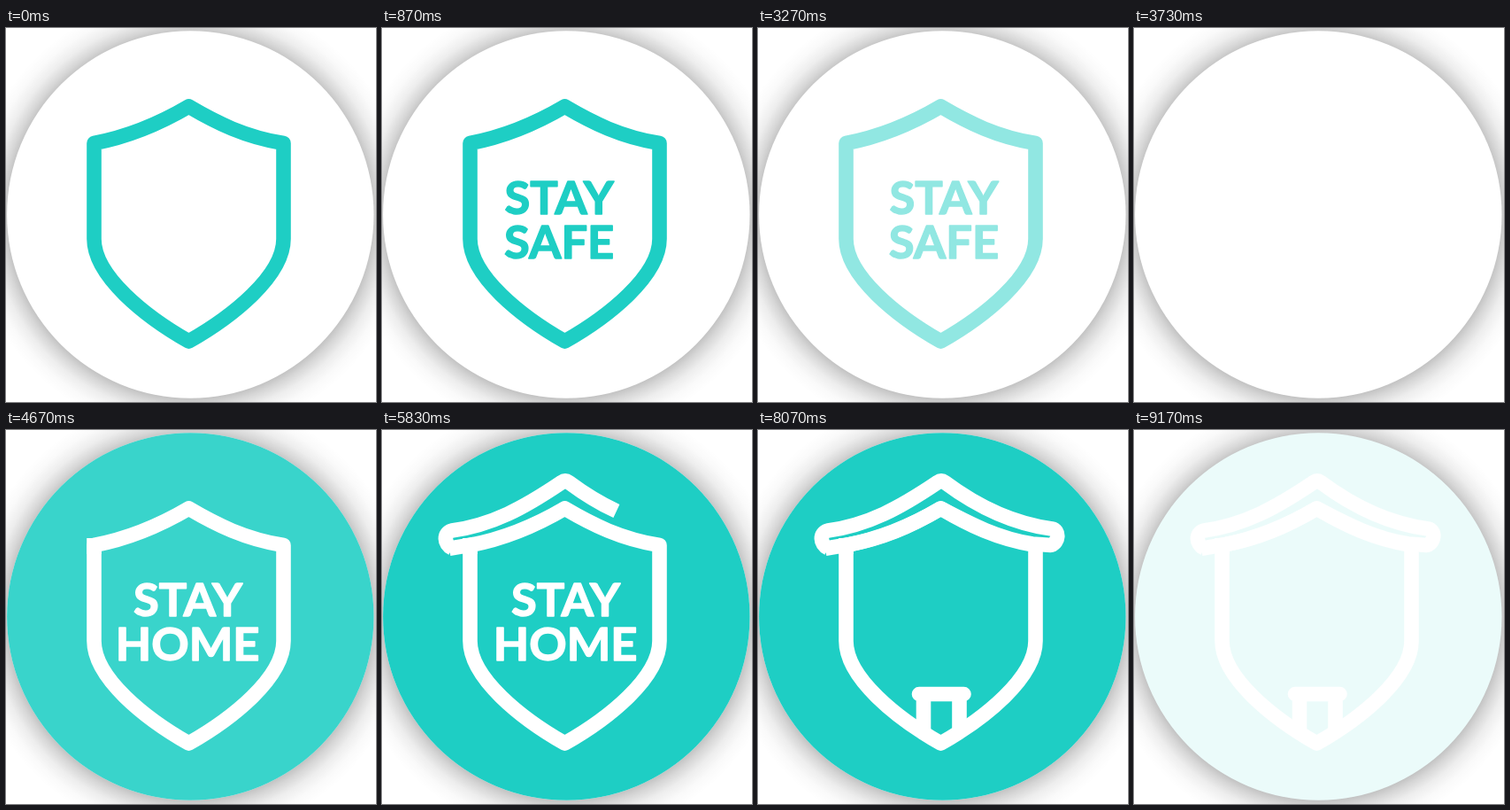
Recreate the animation shown at these times as an HTML page. Size 418x422 px, loop 9.23 s.

```html
<!DOCTYPE html>
<html lang="en">
<head>
<meta charset="utf-8">
<title>Stay safe, stay home</title>
<style>
  html, body { margin: 0; width: 100%; height: 100%; overflow: hidden; background: #fff; }
  svg { display: block; width: 100vw; height: 100vh; }
  text { font: 700 52.5px Lato, sans-serif; text-anchor: middle; stroke-width: 1.5; stroke-linejoin: round; }
  .line { fill: none; stroke-width: 16.6; stroke-linejoin: round; }
  .teal text { fill: #1ecec4; stroke: #1ecec4; }
  .white text { fill: #fff; stroke: #fff; }
  .teal .line { stroke: #1ecec4; }
  .white .line { stroke: #fff; }
</style>
</head>
<body>
<svg viewBox="0 0 418 422">
  <defs>
    <radialGradient id="shadow" gradientUnits="userSpaceOnUse" cx="208.3" cy="211.5" r="250">
      <stop offset=".82" stop-color="#000" stop-opacity=".25"/>
      <stop offset=".855" stop-color="#000" stop-opacity=".16"/>
      <stop offset=".9" stop-color="#000" stop-opacity=".07"/>
      <stop offset=".95" stop-color="#000" stop-opacity=".02"/>
      <stop offset="1" stop-color="#000" stop-opacity="0"/>
    </radialGradient>
    <path id="shield" d="M99.5 130C142 122 175 107 206.5 88.5C238 107 270 123 313.5 130V238C313.5 280 255 326 206.5 353.5C158 326 99.5 280 99.5 238Z"/>
    <clipPath id="inside"><use href="#shield"/></clipPath>
  </defs>

  <rect width="418" height="422" fill="url(#shadow)"/>
  <circle cx="208.3" cy="210.5" r="207.2" fill="#fff"/>
  <circle id="disc" cx="208.3" cy="210.5" r="207.2" fill="#1ecec4"/>

  <g id="safe" class="teal">
    <g clip-path="url(#inside)">
      <g id="safeText">
        <text x="210" y="210">STAY</text>
        <text x="210" y="260">SAFE</text>
      </g>
    </g>
    <use href="#shield" class="line"/>
  </g>

  <g id="home" class="white">
    <g clip-path="url(#inside)">
      <g id="homeText">
        <text x="207.5" y="210">STAY</text>
        <text x="207.2" y="260">HOME</text>
      </g>
    </g>
    <use href="#shield" class="line"/>
    <path class="line" d="M99.5 122V140"/>
    <path id="roof" class="line" pathLength="1" style="stroke-linejoin:bevel"
      d="M104 129L76 133.7L79 133.2C70 129 69 116 79 113.5C125 107 160 88 203 59Q207 56 211 59C250 88 290 106 332 111.5C341 113 340 127 331 130L310 128.5C270 122 240 106 206.5 88.5C170 110 140 122 104 129"/>
    <path id="door" class="line" pathLength="1" d="M187 338V298H182H232.5H227.5V338"/>
  </g>
</svg>
<script>
  const LOOP = 9230;
  const el = id => document.getElementById(id);
  const [disc, safe, safeText, home, homeText, roof, door] =
    ["disc", "safe", "safeText", "home", "homeText", "roof", "door"].map(el);

  const span = (t, from, to) => Math.min(1, Math.max(0, (t - from) / (to - from)));
  const inOut = p => p < .5 ? 2 * p * p : 1 - 2 * (1 - p) ** 2;
  const easeOut = p => Math.sin(p * Math.PI / 2);

  const slide = (node, x) => node.setAttribute("transform", `translate(${x.toFixed(2)} 0)`);
  const show = (node, on) => node.setAttribute("visibility", on ? "visible" : "hidden");
  const trace = (node, p) => {
    show(node, p > 0);
    node.setAttribute("stroke-dasharray", p < 1 ? `${p} 2` : "none");
  };

  function draw(t) {
    const settle = span(t, 4670, 5570);
    const tint = .88 * span(t, 3780, 4670) + .12 * settle;
    disc.setAttribute("opacity", tint * (1 - span(t, 8330, 9250)));

    show(safe, t < 3730);
    safe.setAttribute("opacity", 1 - span(t, 2800, 3720));
    slide(safeText, -168 * (1 - inOut(span(t, 200, 1010))));

    home.setAttribute("display", t < 3730 ? "none" : "inline");
    slide(homeText, 2 * (inOut(settle) - 1) + 178 * inOut(span(t, 7270, 8110)));
    trace(roof, easeOut(span(t, 5570, 6470)));
    trace(door, span(t, 6500, 7130));
  }

  const start = performance.now();
  function tick() {
    draw((performance.now() - start) % LOOP);
    requestAnimationFrame(tick);
  }
  draw(0);
  requestAnimationFrame(tick);
</script>
</body>
</html>
```
